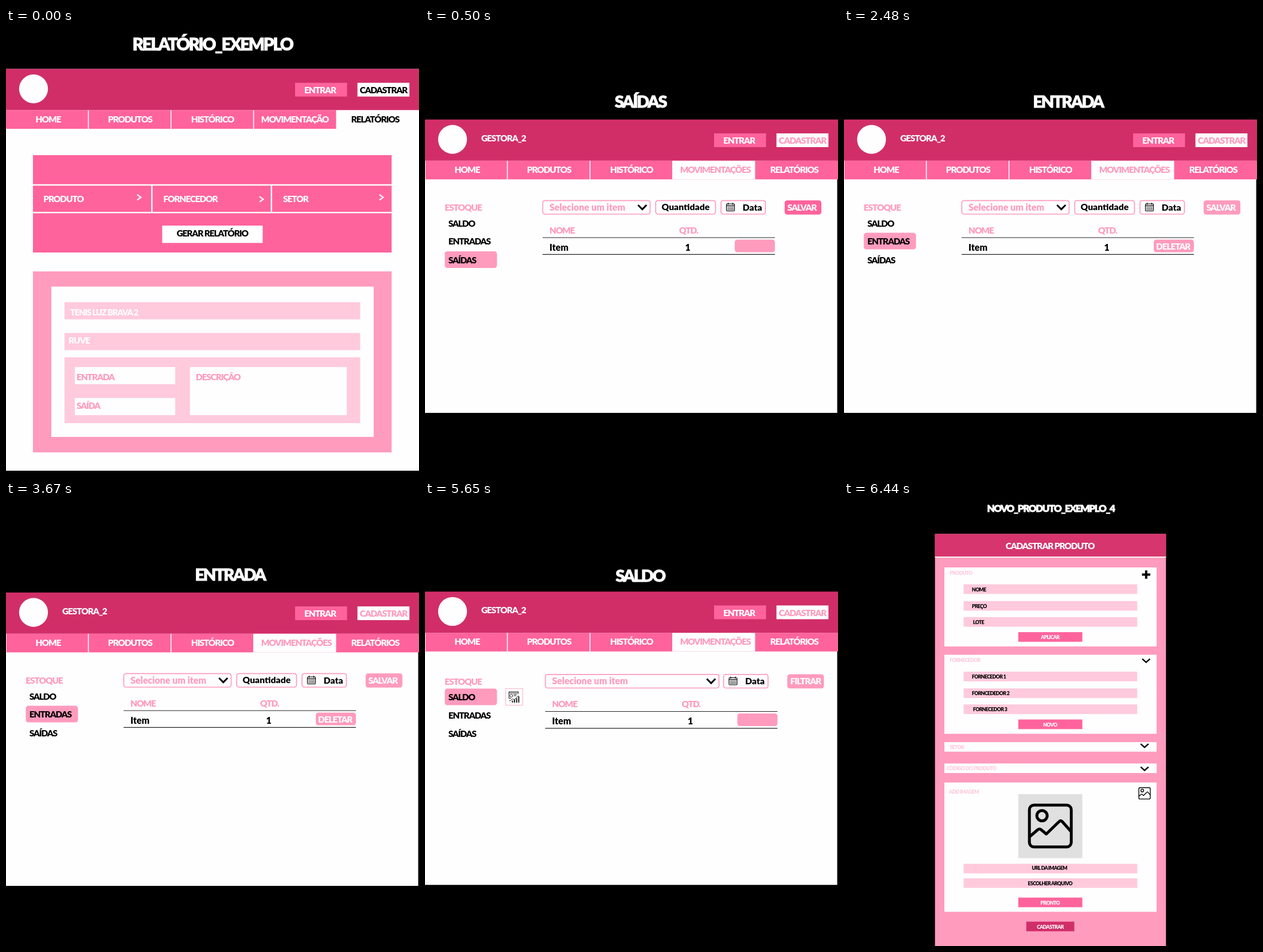
Recreate the animation shown at these times as an HTML page. Size 720 px wide and 777 px high, loop 8 s.

```html
<!DOCTYPE html>
<html lang="pt">
<head>
<meta charset="utf-8">
<title>Telas de estoque</title>
<style>
html, body { margin: 0; width: 100%; height: 100%; overflow: hidden; background: #000; }
svg { display: block; width: 100vw; height: 100vh; }
text { font-family: Lato, "Open Sans", sans-serif; font-weight: 900; letter-spacing: -.07em; }
text.title { letter-spacing: -.08em; stroke: #fefefe; stroke-width: .8; }
text.plain { letter-spacing: 0; }
</style>
</head>
<body>
<svg id="stage" viewBox="0 0 720 777" preserveAspectRatio="none"></svg>
<script>
const WHITE = '#fefefe', BLACK = '#000', DARK = '#d12e68', PINK = '#ff639b',
      LIGHT = '#ff9bbd', PALE = '#ffcadc';

const rect = (x, y, x2, y2, fill, extra = '') =>
  `<rect x="${x}" y="${y}" width="${x2 - x}" height="${y2 - y}" fill="${fill}" ${extra}/>`;
const pill = (x, y, x2, y2, fill) => rect(x, y, x2, y2, fill, 'rx="4.5"');
const frame = (x, y, x2, y2) =>
  rect(x, y, x2, y2, WHITE, `rx="4" stroke="${LIGHT}" stroke-width="1.7"`);
const line = (d, color, width, extra = '') =>
  `<path d="${d}" fill="none" stroke="${color}" stroke-width="${width}" ${extra}/>`;
const label = (s, x, y, fill, size = 15.4, extra = '') =>
  `<text x="${x}" y="${y}" fill="${fill}" font-size="${size}" ${extra}>${s}</text>`;
const mid = (s, x, y, fill, size = 15.4, cls = '') =>
  label(s, x, y, fill, size, `text-anchor="middle" class="${cls}"`);
const plain = (s, x, y, fill) => label(s, x, y, fill, 16, 'class="plain"');
const title = (s, x, y, size = 29) => mid(s, x, y, WHITE, size, 'title');
const move = (x, y, body) => `<g transform="translate(${x} ${y})">${body}</g>`;
const chevronDown = (x, y, w, h, stroke) =>
  line(`M${x - w / 2} ${y - h / 2}l${w / 2} ${h}l${w / 2} ${-h}`, BLACK, stroke);
const chevronRight = (x, y) => line(`M${x} ${y}l6.5 4.7l-6.5 4.7`, WHITE, 2.2);

// Shared header and navigation bar
function header(active, moves, movesX, enrolColor, user) {
  const tabs = [['HOME', 73.5, 0, 143], ['PRODUTOS', 216.2, 143, 287],
    ['HISTÓRICO', 360, 287, 431], [moves, movesX, 431, 575.5],
    ['RELATÓRIOS', 643.5, 575.5, 720]];
  let out = rect(0, 71.5, 720, 143.5, DARK) + rect(0, 143.5, 720, 176, PINK) +
    `<circle cx="48" cy="106.2" r="25.2" fill="${WHITE}"/>` +
    rect(504, 95.7, 594.5, 119.7, PINK) + rect(612.7, 95.7, 703.3, 119.7, WHITE) +
    mid('ENTRAR', 547.5, 114, WHITE) + mid('CADASTRAR', 658, 114, enrolColor);
  if (user) out += label(user, 98, 109.5, WHITE) + rect(0, 143.5, .8, 176, WHITE);
  tabs.forEach(([name, x, left, right], i) => {
    const on = i === active;
    if (on) out += rect(left, 143.5, right, 176, WHITE);
    else if (i && i < 4) out += rect(left - .2, 143.5, left + 1.4, 176, WHITE);
    out += mid(name, x, 164.7, on ? enrolColor : WHITE);
  });
  return out;
}

function report() {
  return rect(0, 71.5, 720, 773, WHITE) +
    title('RELATÓRIO_EXEMPLO', 360, 38.5, 29.5) +
    header(4, 'MOVIMENTAÇÃO', 503.5, BLACK) +
    rect(47, 222, 672.3, 392, PINK) +
    line('M47 274H672.3M47 322.2H672.3M254.3 274V322M462.7 274V322', WHITE, 2.4) +
    label('PRODUTO', 65.3, 304, WHITE) + label('FORNECEDOR', 274.3, 304, WHITE) +
    label('SETOR', 483, 304, WHITE) +
    chevronRight(228.7, 291) + chevronRight(442, 294.3) + chevronRight(651, 291) +
    rect(272.3, 345, 447.5, 375.3, WHITE) +
    mid('GERAR RELATÓRIO', 359.7, 363.5, BLACK) +
    rect(47, 425, 672.3, 741, LIGHT) + rect(79, 451.5, 641, 714, WHITE) +
    rect(102, 478.7, 617.5, 508.7, PALE) + rect(102, 532.5, 617.5, 562.5, PALE) +
    rect(102, 575, 617.5, 690, PALE) +
    rect(120, 592, 295, 622, WHITE) + rect(120, 646, 295, 676, WHITE) +
    rect(320.7, 592, 594, 676, WHITE) +
    label('TENIS LUZ BRAVA 2', 112, 501.5, WHITE, 14.6) +
    label('RUVE', 109, 551.3, WHITE) +
    label('ENTRADA', 123, 615, LIGHT) + label('SAÍDA', 123, 665, LIGHT) +
    label('DESCRIÇÂO', 331, 615, LIGHT);
}

function calendar() {
  return rect(525.5, 307, 539.5, 319.5, 'none', 'rx="1.5" stroke="#000" stroke-width="1.2"') +
    line('M525.5 310.2H539.5M528.5 305V308.5M536.5 305V308.5', BLACK, 1.2) +
    line('M527.5 312.5H538M527.5 314.8H538M527.5 317.1H538', BLACK, 1.2, 'stroke-dasharray="1.5 .7"');
}

function chartIcon() {
  return rect(140.7, 327.3, 170.3, 356.7, WHITE, `stroke="${LIGHT}" stroke-width=".8"`) +
    line('M150 344.5H146.3V333H162.5V336.5M146.3 335.2H162.5M154 337.8H160M155 340H159', '#222', 1) +
    `<circle cx="150.3" cy="340" r="2.5" fill="none" stroke="#222"/>` +
    line('M147 349.5L152.5 345.5L156 347L163 339.5', '#222', 1) +
    line('M152.5 352V348.5M156 352V347M159.7 352V344.5M163.4 352V341', '#222', 2);
}

function stock(name, active, o) {
  const balance = active === 0, dy = balance ? 1.5 : 0, selectEnd = balance ? 508 : 392.5;
  const menu = [['SALDO', 346.7], ['ENTRADAS', 378.3], ['SAÍDAS', 410.7]];
  let side = label('ESTOQUE', 34.3, 319, LIGHT);
  menu.forEach(([s, y], i) => {
    if (i === active) side += pill(34.5, y - 20.7, 125.5, y + 8.3, LIGHT);
    side += label(s, 40.7, y, BLACK);
  });
  const form = frame(205.3, 301.3, selectEnd, 325) +
    plain('Selecione um item', 217, 318.7, LIGHT) +
    chevronDown(selectEnd - 13.7, 312.8, 15, 7.5, 3) +
    (balance ? '' : frame(402.2, 301.3, 506.5, 325) +
      mid('Quantidade', 454.3, 318, BLACK, 15.7, 'plain')) +
    frame(516, 301.3, 593.5, 325) + calendar() +
    label('Data', 553.7, 318.7, BLACK, 15.7, 'class="plain"') +
    pill(627, 301, 691, 325.7, o.buttonFill) + mid(o.button, o.buttonX, 318.8, WHITE) +
    label('NOME', 217, 358.8, LIGHT) + label('QTD.', 443, 358.8, LIGHT) +
    line('M205 366H610M205 395.4H610', '#222', 1.2) +
    plain('Item', 217, 388.8, BLACK) + mid('1', 457.7, 388.8, BLACK, 16) +
    pill(540, 369.5, 610, 391.5, LIGHT) +
    (o.remove ? mid('DELETAR', 573.7, 386.7, WHITE) : '');
  return rect(0, 200, 718.6, balance ? 670.3 : 672, WHITE) +
    title(name, o.x, o.y) +
    move(0, balance ? 86.7 : 88.3, header(3, 'MOVIMENTAÇÕES', 506, LIGHT, 'GESTORA_2')) +
    move(0, dy, side) + (balance ? chartIcon() : '') +
    move(balance ? 4.5 : 0, dy, form);
}

// Picture symbol on a 78 unit square
function picture(x, y, scale, stroke) {
  return `<g transform="translate(${x} ${y}) scale(${scale})" stroke-linejoin="round">` +
    rect(2.5, 2.5, 75.5, 75.5, 'none', `rx="8" stroke="#000" stroke-width="${stroke}"`) +
    `<circle cx="24.5" cy="21" r="9" fill="none" stroke="#000" stroke-width="${stroke}"/>` +
    line('M2.5 58L17 45.5Q20 43 23 45.5L32 53L54 31.5Q57 28.5 60 31.5L75.5 49', BLACK, stroke) + '</g>';
}

function product() {
  const card = (y, y2) => rect(175, y, 545, y2, WHITE);
  const field = y => rect(208.5, y, 511.2, y + 16.8, PALE);
  const small = (s, x, y, fill = BLACK) => label(s, x, y, fill, 8.7);
  const button = (s, y) => rect(303.8, y, 415.5, y + 16.8, PINK) +
    mid(s, 359.3, y + 12, WHITE, 8.7);
  const block = (name, items, action) => card(116, 254) +
    small(name, 184.3, 128.5, PALE) +
    [145.5, 174.7, 202.7].map((y, i) =>
      field(y) + small(items[i], i < 2 ? 223 : 225, y + 12)).join('') +
    button(action, 229);
  return rect(158.6, 57.5, 561.3, 777, LIGHT) + rect(158.6, 57.5, 561.3, 97.3, '#d6366d') +
    rect(158.6, 97, 561.3, 98.8, WHITE) +
    title('NOVO_PRODUTO_EXEMPLO_4', 360.5, 19, 17) +
    mid('CADASTRAR PRODUTO', 359, 84.3, WHITE, 15.4) +
    block('PRODUTO', ['NOME', 'PREÇO', 'LOTE'], 'APLICAR') +
    line('M519.5 128.5H534M526.8 121.2V135.8', BLACK, 4) +
    move(0, 152.5, block('FORNECEDOR', ['FORNECEDOR 1', 'FORNCEDEDOR 2', 'FORNECEDOR 3'], 'NOVO')) +
    chevronDown(526.7, 278.6, 13.5, 6, 2.4) +
    card(421, 437.7) + small('SETOR', 184.3, 433, PALE) + chevronDown(524, 427.2, 13.5, 6, 2.4) +
    card(458.3, 475) + small('CÓDIGO DO PRODUTO', 179, 470, PALE) + chevronDown(524, 467.4, 13.5, 6, 2.4) +
    card(491.5, 717.3) + small('ADD IMAGEM', 183, 510.5, PALE) +
    picture(513.3, 499.8, .273, 5) +
    rect(303.8, 511.8, 415.5, 623.5, '#e0e0e0') + picture(320.7, 528.5, 1, 5) +
    field(633.5) + mid('URL DA IMAGEM', 358.3, 644.3, BLACK, 8.7) +
    field(658.7) + mid('ESCOLHER ARQUIVO', 359.3, 671, BLACK, 8.7) +
    button('PRONTO', 692.5) +
    rect(317.8, 734.5, 401.5, 751.3, DARK) + mid('CADASTRAR', 359.5, 747, WHITE, 8.7);
}

const scenes = [
  [0, report()],
  [500, stock('SAÍDAS', 2, { x: 375.5, y: 139, button: 'SALVAR', buttonX: 657, buttonFill: PINK })],
  [2480, stock('ENTRADA', 1, { x: 390.5, y: 139, button: 'SALVAR', buttonX: 657, buttonFill: LIGHT, remove: true })],
  [4460, stock('SALDO', 0, { x: 375, y: 140.7, button: 'FILTRAR', buttonX: 659, buttonFill: LIGHT })],
  [6440, product()]
];
const LOOP = 8000;
const stage = document.getElementById('stage');
stage.innerHTML = rect(0, 0, 720, 777, BLACK) +
  scenes.map(([, body]) => `<g class="scene" visibility="hidden">${body}</g>`).join('');
const groups = stage.querySelectorAll('.scene');
const start = performance.now();

function show(ms) {
  const now = scenes.filter(([from]) => ms >= from).length - 1;
  groups.forEach((g, i) => g.setAttribute('visibility', i === now ? 'visible' : 'hidden'));
}
function tick() {
  show((performance.now() - start) % LOOP);
  requestAnimationFrame(tick);
}
tick();
</script>
</body>
</html>
```
